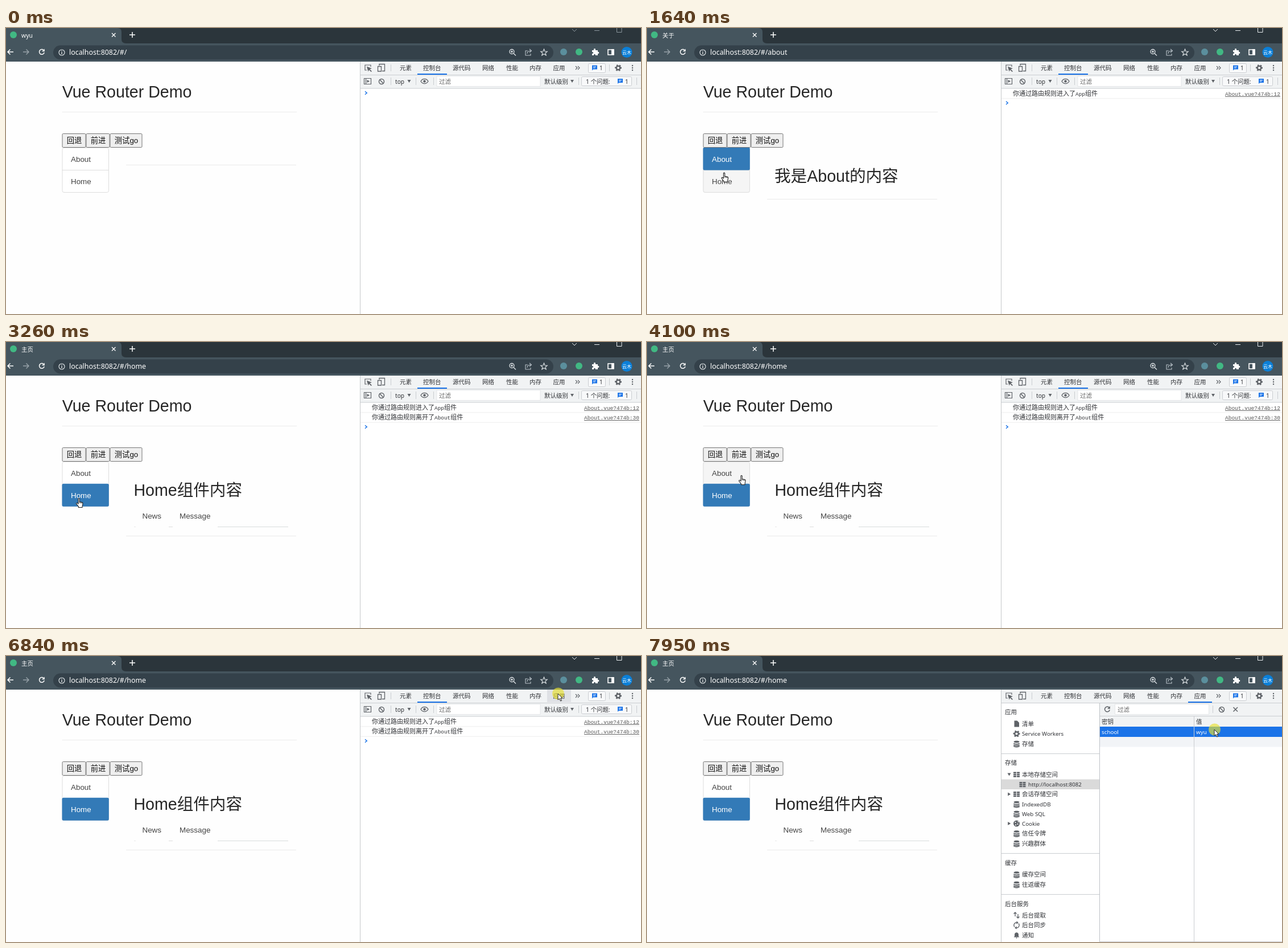
Animation, 1116 px wide and 502 px high, one loop 8 s. Source, as an HTML page:

```html
<!DOCTYPE html>
<html lang="zh">
<head>
<meta charset="utf-8">
<style>
html, body { margin: 0; width: 100%; height: 100%; overflow: hidden; background: #fefefe; }
svg { display: block; }
text { font-family: "Noto Sans", "Noto Sans CJK SC", "Noto Sans CJK", sans-serif; white-space: pre; }
.page text { font-family: "Liberation Sans", "Noto Sans CJK SC", "Noto Sans CJK", sans-serif; }
text.mono { font-family: "Liberation Mono", "Noto Sans CJK SC", "Noto Sans CJK", monospace; }
</style>
</head>
<body>
<svg id="stage" width="1116" height="502" viewBox="0 0 1116 502"></svg>
<script>
const BLUE = '#1a73e8', INK = '#303236', GRAY = '#5f6368', BAR = '#f1f3f4', LINE = '#cacdd1', GREEN = '#41b883';

const rect = (x, y, w, h, fill, extra = '') =>
  `<rect x="${x}" y="${y}" width="${w}" height="${h}" fill="${fill}" ${extra}/>`;
const circle = (x, y, r, fill, extra = '') => `<circle cx="${x}" cy="${y}" r="${r}" fill="${fill}" ${extra}/>`;
const path = (d, stroke = GRAY, width = 1.3, fill = 'none') =>
  `<path d="${d}" stroke="${stroke}" stroke-width="${width}" fill="${fill}"/>`;
const solid = (d, fill = GRAY) => `<path d="${d}" fill="${fill}"/>`;
const text = (x, y, size, str, fill = INK, extra = '') =>
  `<text x="${x}" y="${y}" font-size="${size}" fill="${fill}" ${extra}>${str}</text>`;
const group = (id, body, extra = '') => `<g id="${id}" ${extra}>${body}</g>`;
const at = (x, y, body) => `<g transform="translate(${x} ${y})">${body}</g>`;
const hline = (x1, x2, y, color = LINE) => rect(x1, y, x2 - x1, 1, color);
const vline = (x, y1, y2, color = LINE) => rect(x, y1, 1, y2 - y1, color);

// Icons are centred on the origin.
const icon = {
  doc: () => solid('M-4-5.5H1L4.5-2V5.5H-4Z'),
  gear: () => circle(0, 0, 3.3, 'none', `stroke="${GRAY}" stroke-width="2.4"`) +
    circle(0, 0, 5, 'none', `stroke="${GRAY}" stroke-width="2" stroke-dasharray="2.6 2.636" transform="rotate(-15)"`),
  db: () => solid('M-5-3.5C-5-6 5-6 5-3.5S-5-1-5-3.5Z') +
    path('M-5-.8C-4 1.4 4 1.4 5-.8M-5 1.8C-4 4 4 4 5 1.8M-5 4C-4 6.2 4 6.2 5 4', GRAY, 1.7),
  grid: (c = GRAY) => [-5.5, 0.5].map(x => [-4.5, -1.2, 2.1].map(y => rect(x, y, 5, 2.6, c)).join('')).join(''),
  cookie: () => circle(0, 0, 5.5, GRAY) +
    [[-2, -2], [2, 1], [-1.5, 2.5], [3, -3]].map(([x, y]) => circle(x, y, 1.1, '#fff')).join(''),
  swap: () => path('M-2.5 2V-5M-5-2.5L-2.5-5L0-2.5M2.5-2V5M0 2.5L2.5 5L5 2.5'),
  sync: () => path('M-3.5 3A4.5 4.5 0 0 1 0-4.5H2M0-6.5L2.3-4.5L0-2.5M3.5-3A4.5 4.5 0 0 1 0 4.5H-2M0 6.5L-2.3 4.5L0 2.5'),
  bell: () => solid('M-5 3.5L-3.5 2V-1C-3.5-6 3.5-6 3.5-1V2L5 3.5ZM-1.5 4.3H1.5L0 6Z'),
  ban: () => circle(0, 0, 4.5, 'none', `stroke="${GRAY}" stroke-width="1.5"`) + path('M-3.2-3.2L3.2 3.2', GRAY, 1.5),
  reload: (c = GRAY) => path('M4.2 1A4.4 4.4 0 1 1 3-3.2', c, 1.5) + solid('M4.8-5.5V-.8H0Z', c),
  chat: () => solid('M-4.5-4.5H4.5V2.5H-2.5L-4.5 4.5Z', BLUE) + path('M-2.5-2H2.5M-2.5 0H1', '#fff', .9),
  down: () => solid('M-3-2.5H3L0 2.5Z'),
  right: () => solid('M-2.3-3L2.7 0L-2.3 3Z')
};
const put = (name, x, y, arg) => at(x, y, icon[name](arg));

function browser() {
  const W = '#fff', soft = '#b9c2c8';
  return rect(0, 0, 1116, 28, '#2b353b') + rect(0, 27, 1116, 32, '#45555e') +
    solid('M0 0H196Q203 0 203 7V20Q203 27 211 27V28H0Z', '#45555e') +
    circle(13, 12, 6, GREEN) + text(27, 16.5, 10.4, '', W, 'id="title"') +
    path('M186 9L192.500 15.500M192.500 9L186 15.500', W) + path('M217 12H227M222 7V17', W, 1.5) +
    group('controls', path('M995 2L999 6L1003 2M1034 4.500H1043M1073.500 -1V7.500H1082V-1', 'currentColor', 1)) +
    path('M13 42H3M7.500 37.500L3 42L7.500 46.500', W, 1.5) +
    path('M30 42H40M35.500 37.500L40 42L35.500 46.500', '#98a3aa', 1.4) + put('reload', 63, 42, W) +
    rect(83, 30.5, 879, 25, '#34414a', 'rx="12.500"') +
    circle(98, 43, 5, 'none', 'stroke="#dfe4e7" stroke-width="1.200"') + path('M98 42V46M98 39.700V41', W, 1.2) +
    text(111, 47, 12.4, '', W, 'id="url"') +
    circle(889, 41.5, 4, 'none', 'stroke="#dfe4e7" stroke-width="1.300"') + path('M892 44.500L896 48.500M887 41.500H891M889 39.500V43.500', '#dfe4e7') +
    path('M917 40H913V48H922V45M916 45C916 41 919 40 923 40M920 37L923.500 40L920 43', soft, 1.1) +
    path('M945.500 37L947 41L951.300 41.300L948 44L949.200 48L945.500 45.700L941.800 48L943 44L939.700 41.300L944 41Z', '#dfe4e7', 1.1) +
    circle(980, 42, 6, '#5b8f9d') + circle(1007, 42, 6, GREEN) +
    solid('M1030 39H1033C1032 35 1037 35 1036 39H1040V42C1043 41 1043 46 1040 45V48H1036C1036 45 1033 45 1033 48H1030V45C1033 45 1033 42 1030 42Z', W) +
    path('M1058 38H1068V47H1058Z', W, 1.6) + rect(1064, 37, 4.5, 10, W) +
    circle(1091, 42.5, 9.5, '#0a7fd8') + text(1091, 45.5, 8, '云木', W, 'text-anchor="middle"');
}

function page() {
  const button = (x, w, label) => rect(x, 185.5, w - 1, 24, '#efefef', 'rx="1.500" stroke="#767676"') +
    text(x + 7.8, 202.3, 13.3, label, '#111');
  const item = (id, y, label, d) => `<path id="${id}Bg" d="${d}"/>` + text(114, y, 13.4, label, '#444', `id="${id}Text"`);
  return text(98.7, 122, 28.6, 'Vue Router Demo', '#262626') + hline(98.5, 511, 147, '#ececec') +
    item('about', 234.5, 'About', 'M98.500 249V213Q98.500 210 101.500 210H177.500Q180.500 210 180.500 213V249Z') +
    item('home', 273.5, 'Home', 'M98.500 249V286Q98.500 289 101.500 289H177.500Q180.500 289 180.500 286V249Z') +
    rect(99, 210.5, 81.5, 78, 'none', 'rx="3" stroke="#dddddd"') + hline(98.5, 181, 249, '#ddd') +
    group('activeItem', rect(98.5, 209.5, 82.3, 40, '#337ab7', 'rx="2.500"') + text(114, 234.5, 13.4, '', '#fff', 'id="activeText"')) +
    button(99, 42, '回退') + button(141, 42, '前进') + button(183, 57, '测试go') +
    group('panelLine', hline(211, 510, 0, '#eaeaea')) +
    group('aboutView', text(224, 270, 28.6, '我是About的内容', '#262626')) +
    group('homeView', text(224.4, 270, 28.6, 'Home组件内容', '#262626') +
      text(239.5, 309.5, 13.4, 'News', '#444') + text(305, 309.5, 13.4, 'Message', '#444') +
      hline(225, 228, 324, '#e8e8e8') + hline(286, 293, 324, '#ddd') + hline(372, 496, 324, '#d8dcdc'));
}

function devtools() {
  const tabs = [[692, '元素'], [733, '控制台'], [785, '源代码'], [837, '网络'], [879, '性能'], [920, '内存'], [961.5, '应用']];
  return rect(622, 58, 494, 444, '#fff') + rect(622, 58, 494, 24, BAR) +
    rect(951, 59, 42, 22, '#dfe1e5', 'id="tabHover"') + tabs.map(([x, s]) => text(x, 74, 10.5, s)).join('') +
    hline(622, 1116, 82) + rect(723, 80, 52, 2, BLUE, 'id="underline"') +
    path('M634 74H631V65H641V68', GRAY, 1.2) + solid('M634 67.500L643 71L639.300 72.300L643 76L641.700 77L638 73.500L636.500 76.500Z') +
    path('M656 66V63.500H665.500V75.500H661M653.500 67.500H659.500V76H653.500Z', GRAY, 1.3) + vline(676, 64, 76) +
    path('M1001 67L1004 70L1001 73M1005 67L1008 70L1005 73', GRAY, 1.2) +
    rect(1023.5, 62.5, 30, 16, '#f8f9fa', `id="issues" rx="2" stroke="${LINE}"`) +
    put('chat', 1034.5, 70) + text(1043, 74, 10, '1') + vline(1060, 64, 76) + put('gear', 1076, 70) +
    [66, 70, 74].map(y => circle(1101, y, 1.2, GRAY)).join('') +
    group('consoleView', consoleView()) + group('appView', appView()) + vline(622, 58, 502, '#c6c9cc');
}

function consoleView() {
  const log = (id, y, str, line) => group(id,
    text(643, y, 11, str.replace(/[A-Za-z]+/, w => `<tspan font-size="9.4">${w}</tspan>`), INK, 'class="mono"') +
    text(1016, y, 9.5, 'About.vue?474b:' + line, '#555', 'class="mono" text-decoration="underline"') +
    hline(623, 1116, y + 4.5, '#eeeeee'));
  return rect(622, 83, 494, 23, BAR) + hline(622, 1116, 105.5) +
    path('M629.500 88.500H641.500V98.500H629.500ZM632.500 88V99', GRAY, 1.2) + solid('M634.500 91L639 93.500L634.500 96Z') +
    put('ban', 660, 94) + vline(676, 87, 100) + text(684, 97.5, 10.2, 'top') + put('down', 708.5, 93.5) + vline(720, 87, 100) +
    path('M729 93.500C732 88 739 88 742 93.500C739 99 732 99 729 93.500Z', GRAY) + circle(735.5, 93.5, 2.2, GRAY) + vline(751, 87, 100) +
    rect(757, 84.5, 182, 18, '#fff', 'stroke="#e4e6e8"') + text(761, 98, 10.5, '过滤', '#666') +
    text(946, 97.5, 10.5, '默认级别') + put('down', 995, 93.5) + vline(1006, 87, 100) +
    rect(1011.5, 85.5, 88, 16, '#f8f9fa', `rx="2" stroke="${LINE}"`) + text(1019, 97.5, 10.4, '1 个问题:') +
    put('chat', 1079.5, 93.5) + text(1088, 97.5, 10, '1') + vline(1108, 87, 100) +
    log('enterLog', 118.8, '你通过路由规则进入了App组件', 12) +
    log('leaveLog', 136.2, '你通过路由规则离开了About组件', 30) +
    group('prompt', path('M631 -2.700L634.200 0L631 2.700', BLUE, 1.5));
}

function appView() {
  const items = [
    ['doc', 119, '清单'], ['gear', 136.5, 'Service Workers'], ['db', 154, '存储'],
    ['grid', 208, '本地存储空间', 'down'], ['grid', 242.5, '会话存储空间', 'right'],
    ['db', 260, 'IndexedDB'], ['db', 277, 'Web SQL'], ['cookie', 294, 'Cookie', 'right'],
    ['db', 311.5, '信任令牌'], ['db', 329, '兴趣群体'], ['db', 383.5, '缓存空间'], ['db', 401, '往返缓存'],
    ['swap', 455, '后台提取'], ['sync', 472.5, '后台同步'], ['bell', 490, '通知']];
  const heads = [['应用', 98], ['存储', 187], ['缓存', 363], ['后台服务', 435]];
  return rect(622, 83, 494, 419, '#fff') + rect(951, 80, 42, 2, BLUE) +
    rect(623, 216.5, 172, 17.5, '', 'id="treeRow"') +
    heads.map(([s, y]) => text(629, y + 4, 10.5, s)).join('') + [171, 346, 418].map(y => hline(622, 795, y)).join('') +
    items.map(([name, y, s, arrow]) => put(name, 649.5, y) + text(659, y + 3.8, /[A-Z]/.test(s) ? 9.75 : 10.5, s) +
      (arrow ? put(arrow, 636.5, y) : '')).join('') +
    group('treeIcon', put('grid', 660, 225.5, 'currentColor')) + text(670, 229, 9.65, 'http://localhost:8082', '', 'id="treeText"') +
    rect(795, 83, 321, 41, BAR) + put('reload', 809, 93.5) +
    rect(822.5, 84.5, 165, 18, '#fff', 'stroke="#e4e6e8"') + text(827, 98, 10.5, '过滤', '#666') + vline(994, 87, 100) +
    put('ban', 1010, 94) + path('M1030.500 90L1038 97.500M1038 90L1030.500 97.500', GRAY, 1.5) + hline(795, 1116, 105) +
    text(799, 119, 10.5, '密钥') + text(965, 119, 10.5, '值') + hline(795, 1116, 124) +
    rect(796, 124, 320, 18, '', 'id="dataRow"') + rect(796, 142, 320, 17.5, '#f2f4f7') +
    group('dataText', text(799, 137, 9.8, 'school', 'currentColor') + text(965, 137, 9.8, 'wyu', 'currentColor')) +
    vline(795, 83, 502, '#bdc1c6') + vline(961, 106, 502, LINE) + hline(795, 1116, 501);
}

function pointer() {
  return circle(.5, 0, 10.5, '#e8e030', 'id="click" fill-opacity=".66"') +
    group('hand', path('M-1 1Q0-.500 1.200 1V6.500L6 7.500Q7.300 8 7 10L6 15V16.500H-.500V15L-4.300 10Q-4.500 8-2.500 8.700L-1 10Z', '#222', 1.1, '#fff') +
      path('M1.200 6.500V9M3.400 7V9.500M5.300 7.500V9.500', '#222', .8)) +
    group('arrow', path('M0 0V11L2.600 8.700L4.600 13L6.500 12.200L4.600 8H8Z', '#222', 1, '#fff')) +
    group('beam', path('M-2-5.500H2M-2 5.500H2M0-5.500V5.500', '#222', 1));
}

document.getElementById('stage').innerHTML = rect(0, 0, 1116, 502, '#fefefe') +
  group('page', page(), 'class="page"') + devtools() + browser() + group('pointer', pointer());

const el = {};
document.querySelectorAll('[id]').forEach(node => { el[node.id] = node; });
const show = (id, on) => { el[id].style.display = on ? '' : 'none'; };
const paint = (id, color) => el[id].setAttribute('fill', color);
const move = (id, x, y) => el[id].setAttribute('transform', `translate(${x} ${y})`);

// Each move: start, end, easing power, then a cubic curve.
const MOVES = [
  [130, 900, 1.6, [997, 484], [700, 300], [150, 90], [141, 237]],
  [1500, 1920, 1.5, [141, 237], [138, 249], [132, 262], [128, 274]],
  [3260, 4030, 1, [128, 274], [125, 262], [120, 245], [156, 240]],
  [4100, 4590, 1.3, [166, 234], [200, 228], [600, 160], [730, 150]],
  [4730, 5500, 1.2, [730, 150], [900, 95], [1190, 70], [1042, 69]],
  [6110, 6310, 1.3, [1042, 69], [1020, 70], [990, 68], [970, 66]],
  [6910, 7610, 1.4, [970, 66], [975, 90], [990, 115], [997, 129]]
];
const CLICKS = [[970, 1300], [2580, 2660], [6840, 6980], [7810, 8000]];
const TICK = 70;

function pointerAt(t) {
  const current = MOVES.filter(m => m[0] <= t).pop();
  if (!current) return null;
  const [start, end, power, ...curve] = current;
  const s = t >= end ? 1 : Math.floor((t - start) / TICK) * TICK / (end - start);
  const u = 1 - (1 - s) ** power, v = 1 - u;
  const weights = [v ** 3, 3 * v * v * u, 3 * v * u * u, u ** 3];
  return [0, 1].map(axis => weights.reduce((sum, w, i) => sum + w * curve[i][axis], 0));
}

function render(t) {
  const route = t < 1040 ? '' : t < 2580 ? 'about' : 'home';
  const app = t >= 6910, selected = t >= 7880;
  const p = pointerAt(t), [x, y] = p || [-99, -99];
  const over = x > 99 && x < 181 && y > 210 && y < 289 ? (y < 249 ? 'about' : 'home') : '';

  el.title.textContent = t < 1500 ? 'wyu' : t < 2860 ? '关于' : '主页';
  el.url.textContent = 'localhost:8082/#/' + route;
  el.controls.style.color = t < 1040 ? '#8b969d' : '#e8ecee';

  for (const name of ['about', 'home']) {
    paint(name + 'Bg', over === name ? '#f5f5f5' : '#fff');
    show(name + 'View', route === name);
  }
  show('activeItem', route);
  move('activeItem', 0, route === 'home' ? 39.3 : 0);
  el.activeText.textContent = route === 'home' ? 'Home' : 'About';
  move('panelLine', 0, { '': 240, about: 300, home: 340 }[route]);

  show('enterLog', route);
  show('leaveLog', route === 'home');
  move('prompt', 0, { '': 114, about: 131.5, home: 149 }[route]);
  show('consoleView', !app);
  show('appView', app);
  show('underline', !app);
  show('tabHover', !app && x > 951 && x < 993 && y < 82);
  paint('issues', x > 1023 && x < 1054 && y < 80 ? '#e3e5e8' : '#f8f9fa');

  paint('treeRow', selected ? '#dadada' : BLUE);
  paint('treeText', selected ? INK : '#fff');
  el.treeIcon.style.color = selected ? GRAY : '#fff';
  paint('dataRow', selected ? BLUE : '#fff');
  el.dataText.style.color = selected ? '#fff' : INK;

  show('pointer', p);
  move('pointer', x, y);
  const beam = x > 622 && y > 106 && !app;
  show('hand', over);
  show('beam', !over && beam);
  show('arrow', !over && !beam);
  show('click', CLICKS.some(([a, b]) => t >= a && t < b));
}

const begin = performance.now();
function frame() {
  render((performance.now() - begin) % 8000);
  requestAnimationFrame(frame);
}
render(0);
requestAnimationFrame(frame);
</script>
</body>
</html>
```
